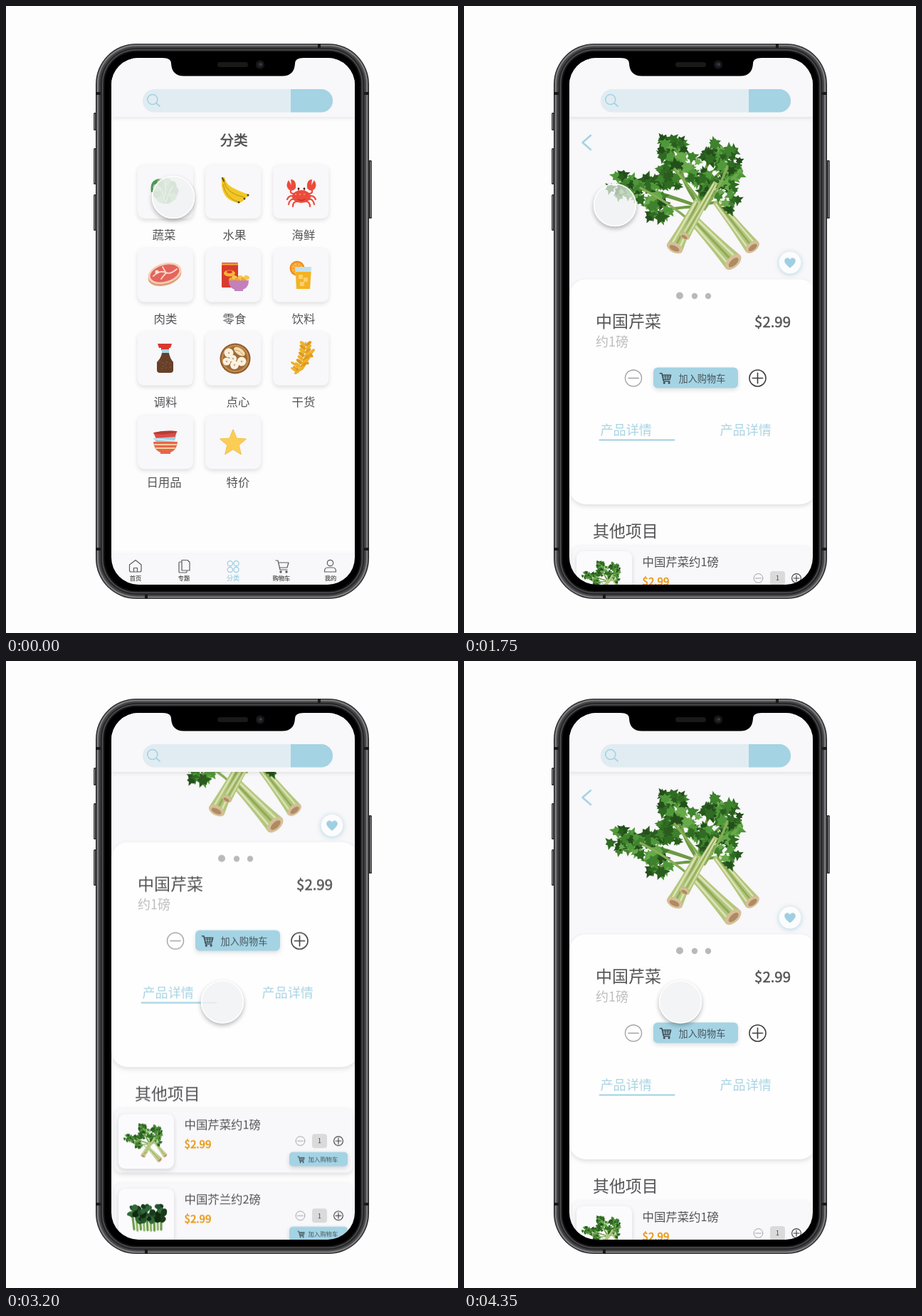
An HTML page with a canvas for the animation above (4400 ms loop, 635 px wide and 882 px high).

```html
<!DOCTYPE html>
<html lang="zh-CN">
<head>
<meta charset="utf-8">
<title>分类</title>
<style>
html, body { margin: 0; width: 100%; height: 100%; overflow: hidden; background: #fefdfe; }
canvas { display: block; width: 635px; height: 882px; }
</style>
</head>
<body>
<canvas id="stage"></canvas>
<script>
const W = 635, H = 882, LOOP = 4400, STEP = 50;
const DPR = window.devicePixelRatio || 1;
const FONT = '"Noto Sans CJK SC", "Noto Sans CJK", "Noto Sans", sans-serif';
const BLUE = '#a4d3e4', PANEL = '#f8f7f9', PAPER = '#fefdfe', INK = '#545456';
let g;

function makeCanvas(cv, h) {
  cv.width = W * DPR;
  cv.height = h * DPR;
  const c = cv.getContext('2d');
  c.scale(DPR, DPR);
  return c;
}

function layer(h, draw) {
  const cv = document.createElement('canvas');
  g = makeCanvas(cv, h);
  draw();
  return cv;
}

// ---- drawing helpers ----
function shade(color, blur, dy) {
  g.shadowColor = color;
  g.shadowBlur = blur * DPR;
  g.shadowOffsetY = dy * DPR;
}

function box(x, y, w, h, r, fill, shadow) {
  g.save();
  if (shadow) shade(shadow, 6, 2.5);
  g.fillStyle = fill;
  g.beginPath();
  g.roundRect(x, y, w, h, r);
  g.fill();
  g.restore();
}

function oval(x, y, rx, ry, fill, turn = 0) {
  g.fillStyle = fill;
  g.beginPath();
  g.ellipse(x, y, rx, ry, turn, 0, 7);
  g.fill();
}

const dot = (x, y, r, fill) => oval(x, y, r, r, fill);
const fillPath = (d, c) => { g.fillStyle = c; g.fill(new Path2D(d)); };

function line(d, color, w) {
  g.strokeStyle = color;
  g.lineWidth = w;
  g.lineCap = g.lineJoin = 'round';
  g.stroke(new Path2D(d));
}

function ring(x, y, r, color, w) {
  g.strokeStyle = color;
  g.lineWidth = w;
  g.beginPath();
  g.arc(x, y, r, 0, 7);
  g.stroke();
}

// y is the optical middle of the line; heavy thickens the strokes
function text(s, x, y, size, color, align = 'left', heavy = 0) {
  g.font = `${size}px ${FONT}`;
  g.textAlign = align;
  g.fillStyle = g.strokeStyle = color;
  g.fillText(s, x, y + size * .38);
  if (heavy) {
    g.lineWidth = heavy;
    g.strokeText(s, x, y + size * .38);
  }
}

function at(x, y, s, draw) {
  g.save();
  g.translate(x, y);
  g.scale(s, s);
  draw();
  g.restore();
}

function seeded(n) {
  return () => (n = (n * 16807) % 2147483647) / 2147483647;
}

// ---- vegetables ----
const GREENS = ['#234f1b', '#2f6b22', '#3f822d', '#4f983a', '#2a5c1f', '#68a94a'];

function frond(x, y, r, turn, color) {
  g.fillStyle = color;
  g.beginPath();
  for (let i = 0; i < 12; i++) {
    const a = turn + i * Math.PI / 6, k = i % 2 ? r * .55 : r * (i % 4 ? .8 : 1.15);
    g.lineTo(x + Math.cos(a) * k, y + Math.sin(a) * k);
  }
  g.fill();
}

function stalk(x1, y1, x2, y2, w) {
  const a = Math.atan2(y2 - y1, x2 - x1);
  at(x1, y1, 1, () => {
    g.rotate(a);
    const n = Math.hypot(x2 - x1, y2 - y1);
    fillPath(`M0 ${-w * .3} Q${n * .6} ${-w * .4} ${n} ${-w * .6} V${w * .6} Q${n * .6} ${w * .4} 0 ${w * .3}Z`, '#b3c67c');
    for (const k of [-.3, 0, .3])
      line(`M4 ${w * k * .5} L${n - 6} ${w * k}`, k ? '#dbe3b4' : '#8faa58', w * .13);
    oval(n, 0, w * .35, w * .6, '#d5bf98');
    oval(n + 1, 0, w * .18, w * .38, '#b08a62');
  });
}

function celery() {
  const rnd = seeded(77);
  const clumps = [[-82, -22, 23, 16, 32], [-48, -15, 24, 24, 36], [-16, -72, 17, 21, 26],
    [-2, -42, 32, 24, 44], [44, -66, 17, 15, 20], [66, -50, 16, 22, 32],
    [46, -20, 30, 22, 32], [-34, 16, 18, 15, 16], [66, 2, 11, 12, 8]];
  for (const [x, y] of clumps) line(`M${x} ${y} Q${x * .5} ${y * .6} 22 8`, '#6d9a43', 4);
  stalk(46, 0, 97, 65, 19);
  for (const [cx, cy, rx, ry, n] of clumps)
    for (let i = 0; i < n; i++) {
      const a = rnd() * 6.283, k = Math.sqrt(rnd());
      frond(cx + Math.cos(a) * k * rx, cy + Math.sin(a) * k * ry, 5 + rnd() * 6, rnd() * 6, GREENS[i % 6]);
    }
  line('M-60 -18 Q-20 2 14 32 M-12 -45 Q8 -20 28 6 M62 -48 Q52 -20 30 12', '#86ad56', 3.5);
  stalk(8, 20, 70, 86, 23);
  stalk(22, 0, -12, 66, 20);
  stalk(46, -26, 2, 50, 12);
}

function leaf(x1, y1, x2, y2, w, color, rib) {
  const dx = x2 - x1, dy = y2 - y1, n = Math.hypot(dx, dy);
  const nx = -dy / n * w, ny = dx / n * w, mx = x1 + dx * .65, my = y1 + dy * .65;
  fillPath(`M${x1} ${y1} Q${mx + nx} ${my + ny} ${x2} ${y2} Q${mx - nx} ${my - ny} ${x1} ${y1}`, color);
  line(`M${x1} ${y1} L${x1 + dx * .8} ${y1 + dy * .8}`, rib, .7);
}

function gaiLan() {
  const rnd = seeded(12);
  for (let i = 0; i < 9; i++) {
    const x = -20 + i * 5;
    line(`M${x} 0 L${x * .95 + 1} ${17 + rnd() * 3}`, i % 2 ? '#8fb86a' : '#6f9c4c', 3.2);
  }
  for (let i = 0; i < 55; i++)
    oval(-24 + rnd() * 48, -15 + rnd() * 20, 3 + rnd() * 3, 3 + rnd() * 2,
      ['#183a1b', '#24512a', '#31693a', '#10290f'][i % 4], rnd() * 3);
}

function spinach() {
  for (let i = 0; i < 18; i++) {
    const a = -1.75 + i * .12, r = 38 + (i * 7 % 5) * 4;
    leaf(-17, 16, -15 + Math.cos(a) * r * 1.05, 15 + Math.sin(a) * r, 8,
      ['#22491f', '#356a2d', '#2a5725', '#477f38'][i % 4], '#6f9b55');
  }
  for (let i = 0; i < 6; i++) line(`M${-28 + i * 2} ${16 + i} L${-10 + i * 2} ${3 + i * 2}`, '#84ac5d', 1.7);
}

function lettuce() {
  for (let i = 0; i < 15; i++) {
    const k = i / 14, y = Math.sin(i * 2.4) * 10;
    leaf(24 - k * 6, 18 + y * .3, -25 + k * 30, -14 + y - k * 5, 9,
      ['#588b2a', '#76aa38', '#93bd4d', '#467722'][i % 4], '#bed681');
  }
  for (let i = 0; i < 5; i++) line(`M${17 + i * 2} ${21 - i * 2} L${-5 + i * 4} ${4 - i}`, '#b6d17c', 1.4);
}

function bokChoy() {
  leaf(4, 13, -30, 16, 12, '#6d9e3b', '#bfd98e');
  leaf(8, 8, -26, -2, 12, '#83b04b', '#cfe3a2');
  leaf(8, 8, -14, -12, 11, '#5e9136', '#bfd98e');
  leaf(8, 4, 0, -18, 10, '#75a844', '#cfe3a2');
  leaf(10, 8, 17, -5, 9, '#679a3c', '#cfe3a2');
  for (let i = 0; i < 5; i++)
    line(`M${-9 + i * 5} ${8 - Math.abs(i - 2) * 2} Q6 11 ${23 + i} ${9 + i * 2}`, i % 2 ? '#c5d998' : '#e0e9c2', 4);
  oval(27, 15, 3, 5, '#eef1dc');
}

// ---- category icons ----
function cabbage() {
  fillPath('M204 262 Q201 245 215 243 Q221 250 212 263Z', '#4f9a58');
  dot(224, 261, 17, '#a9cfa5');
  for (let i = 0; i < 9; i++) dot(224 + Math.cos(i * .7) * 13, 260 + Math.sin(i * .7) * 13, 5.5, i % 2 ? '#bcdcb5' : '#a2c99d');
  line('M224 276 Q221 260 213 252 M225 276 Q229 261 234 254 M224 267 L224 249', '#dcebd6', 1.3);
}

function bananas() {
  fillPath('M303 242 L307 241 Q309 251 319 256 Q331 262 341 265 Q340 269 336 270 Q333 277 326 277 Q305 273 303 252Z', '#f1c727');
  line('M306 247 Q310 264 334 269 M305 251 Q308 270 327 276', '#b88f16', 1);
  line('M304 242 L306 246', '#6f5a18', 2.5);
  for (const [x, y] of [[340, 266], [335, 271], [327, 276]]) dot(x, y, 1.5, '#55401a');
}

function crab() {
  const red = '#ec4b3b';
  for (const s of [-1, 1]) {
    at(415, 262, 1, () => {
      g.scale(s, 1);
      line('M8 2 Q18 3 14 -5 M10 6 Q17 3 20 10 M9 10 Q16 8 18 17 M6 13 Q12 13 12 20', red, 2.2);
      fillPath('M8 -6 Q7 -18 15 -18 L14 -10 L18 -17 Q23 -10 18 -4 Q12 0 8 -6Z', red);
      line('M4 -1 L4 -5', red, 1.5);
      dot(4, -5, 1.4, '#40201c');
    });
  }
  oval(415, 268, 13, 9, red);
  line('M410 272 Q415 275 420 272', '#a9271e', 1);
  for (const x of [407, 413, 419]) dot(x, 265, 1, '#ff9a7d');
}

function meat() {
  oval(223, 379, 24, 14, '#dca07c', -.28);
  oval(223, 376, 24, 14, '#f7cfb2', -.28);
  oval(223, 376, 21, 11.5, '#e4645f', -.28);
  line('M207 380 Q216 371 224 375 Q231 378 240 370 M218 384 Q223 377 226 375 M220 367 L224 374', '#fbd9c3', 1.8);
  dot(212, 374, 2.6, '#fbe7d8');
}

function snack() {
  box(303, 361, 23, 35, 1, '#d93a2f');
  g.fillStyle = '#f3a12e';
  g.fillRect(303, 362, 23, 2.5);
  oval(314, 376, 8, 4.5, '#f2b632');
  oval(314, 374, 4, 2, '#d93a2f');
  for (let i = 0; i < 6; i++) oval(317 + i * 4.2, 385 - i % 2 * 3, 4, 3, i % 2 ? '#f6c64c' : '#e9a92e', .4);
  fillPath('M313 386 H341 Q341 396 333 399 V401 H321 V399 Q313 396 313 386Z', '#c47fbd');
}

function drink() {
  dot(409, 369, 10.5, '#f08d1f');
  dot(409, 369, 8, '#fbb545');
  line('M409 361 V377 M401 369 H417 M403.5 363.5 L414.5 374.5 M403.5 374.5 L414.5 363.5', '#f08d1f', 1);
  fillPath('M406 367 H429 L427 398 H408Z', '#bfe0ee');
  fillPath('M407 374 H428.5 L427 398 H408Z', '#f5b321');
  for (const [x, y] of [[411, 378], [418, 382], [413, 388]]) box(x, y, 6, 6, 1, '#fad06e');
}

function sauce() {
  fillPath('M213 475 H233 L231 481 H229 V484 H218 V481 H215Z', '#d8382f');
  box(219, 483, 10, 6, 0, '#a9d6e6');
  fillPath('M219 488 H229 Q230 495 235 501 V512 Q235 516 231 516 H216 Q212 516 212 512 V501 Q218 495 219 488Z', '#68402a');
  for (let i = 0; i < 9; i++) dot(216 + i * 5 % 16, 500 + i * 7 % 13, .8, '#8d6145');
}

function dimSum() {
  dot(322, 496, 21.5, '#8f5a2c');
  dot(322, 496, 19.5, '#c18a4b');
  dot(322, 496, 17, '#9c6a38');
  for (const [x, y, r] of [[313, 488, 6.5], [310, 500, 5.5], [321, 505, 6], [331, 500, 6.5], [319, 496, 5]]) {
    dot(x, y, r, '#fbf1e0');
    dot(x, y, 1.3, '#c9ad86');
  }
  oval(328, 486, 9, 4.5, '#f5dfb4', .6);
  line('M322 484 Q329 484 333 491', '#d0a367', 1);
}

function wheat() {
  const gold = ['#eeb12b', '#e09a1c'];
  line('M406 516 Q418 500 421 473 M410 512 Q424 504 432 484', '#d89a23', 1.3);
  for (let i = 0; i < 8; i++) {
    const y = 473 + i * 5, x = 421 - i * i * .2;
    oval(x - 4, y + 2, 5, 2.3, gold[i % 2], .7);
    oval(x + 4, y + 2, 5, 2.3, gold[1 - i % 2], -.7);
    if (i < 5) oval(430 - i * 3, 486 + i * 5, 5, 2.2, gold[i % 2], i % 2 ? .5 : -.8);
  }
  for (let i = 0; i < 4; i++) oval(404 + i % 2 * 5, 503 + i * 4, 4.5, 1.8, gold[0], i % 2 ? -.6 : .6);
}

function bowls() {
  fillPath('M207 600 Q224 597 240 598 L237 609 H211Z', '#d94f45');
  oval(224, 600, 16.5, 2.2, '#b73c35', -.06);
  fillPath('M207 608 L239 606 L235 616 H213Z', '#a5cfe2');
  line('M210 609 L238 612', '#e2eff5', 1.5);
  fillPath('M207 613 H241 Q240 625 231 628 V630 H217 V628 Q208 625 207 613Z', '#e5674c');
  line('M209 617 H239 M211 622 H237', '#f7cf9b', 2);
}

function star() {
  let d = '';
  for (let i = 0; i < 10; i++) {
    const a = i * Math.PI / 5 - Math.PI / 2, r = i % 2 ? 8.5 : 19;
    d += `${i ? 'L' : 'M'}${319 + Math.cos(a) * r} ${615 + Math.sin(a) * r}`;
  }
  line(d + 'Z', '#e9b83f', 1.2);
  fillPath(d + 'Z', '#fbcd55');
}

// ---- shared interface parts ----
function cart(x, y, s, color, lw = 1.3) {
  at(x, y, s, () => {
    line('M-9 -8 H-6 L-3 5 H7 M-5 -5 H9 L7 2 H-4', color, lw);
    dot(-2, 8, 1.7, color);
    dot(6, 8, 1.7, color);
  });
}

function darkCart(x, y, s) {
  cart(x, y, s, '#3c4a50', 1.8);
  at(x, y, s, () => line('M-4 -2 H8 M0 -5 V2 M4 -5 V2', '#3c4a50', 1.2));
}

function stepper(x, y, r, plus, w) {
  const color = plus ? '#3d3d3f' : '#a3a3a6', k = r * .62;
  ring(x, y, r, color, w);
  line(`M${x - k} ${y} H${x + k}` + (plus ? `M${x} ${y - k} V${y + k}` : ''), color, w);
}

const chevron = () => line('M178 182 L166.5 192 L178 202', BLUE, 2.5);

function nav() {
  g.save();
  shade('rgba(0,0,0,.05)', 5, -1);
  g.fillStyle = PANEL;
  g.fillRect(148, 771, 342, 44);
  g.restore();
  const c = '#5c5c5e', on = '#94cfe2';
  line('M173.5 786 L182 779.5 L190 786 V794 Q190 796 188 796 H175.5 Q173.5 796 173.5 794Z M179.5 796 V790.5 H184.5 V796', c, 1.2);
  line('M246 782 H244 Q243 782 243 783 V796 Q243 797 244 797 H253 Q254 797 254 796 V795 M247 779.5 H255 L258 782.5 V794 H247Z', c, 1.2);
  for (const x of [314.8, 323.5]) for (const y of [784.2, 793]) ring(x, y, 3.6, on, 1.2);
  cart(388, 788, 1, c, 1.2);
  ring(455.5, 783.5, 4.2, c, 1.2);
  line('M447.5 796 Q447 790 452 790 H459 Q464 790 463.5 796Z', c, 1.2);
  [['首页', 182], ['专题', 250], ['分类', 319], ['购物车', 387], ['我的', 456]].forEach(([s, x], i) =>
    text(s, x, 805, i === 2 ? 9 : 8.2, i === 2 ? on : '#444', 'center', .15));
}

const PRODUCTS = [['中国芹菜约1磅', '$2.99'], ['中国芥兰约2磅', '$2.99'], ['台湾菠菜约1磅', '$2.91'],
  ['A菜(油麦菜)约1磅', '$1.99'], ['青江菜约2磅', '$2.29']];
const PLANTS = [celery, gaiLan, spinach, lettuce, bokChoy];

function product(i, top) {
  const [name, price] = PRODUCTS[i];
  box(152.5, top, 334.5, 90.5, 9, PANEL, 'rgba(0,0,0,.13)');
  box(158, top + 8, 78, 77, 9, '#fbfafc', 'rgba(0,0,0,.14)');
  at(i ? 198 : 196, top + 48, i ? 1 : .285, PLANTS[i]);
  text(name, 250.5, top + 23, 16.4, INK);
  text(price, 250.5, top + 50, 15.2, '#e8960f', 'left', .5);
  stepper(413.5, top + 46, 6.4, false, 1);
  box(430, top + 36, 21, 20, 4, '#dadadb');
  text('1', 440.5, top + 46, 9, '#444', 'center');
  stepper(467, top + 46, 6.4, true, 1.1);
  box(398, top + 61.5, 82, 20, 5, BLUE, 'rgba(0,0,0,.14)');
  darkCart(414.5, top + 72, .52);
  text('加入购物车', 424.5, top + 72, 8.4, '#47565c');
}

// ---- pages ----
function blank(h) {
  g.fillStyle = PAPER;
  g.fillRect(0, 0, W, h);
}

function categoryPage() {
  blank(H);
  text('分类', 320, 189, 19.6, '#4c4c4e', 'center', .5);
  const cells = [['蔬菜', 222, cabbage], ['水果', 321, bananas], ['海鲜', 418, crab],
    ['肉类', 224, meat], ['零食', 321, snack], ['饮料', 418, drink],
    ['调料', 224, sauce], ['点心', 326, dimSum], ['干货', 418, wheat],
    ['日用品', 222, bowls], ['特价', 326, star]];
  const labelY = [322, 439.5, 556.5, 670];
  cells.forEach(([name, x, icon], i) => {
    const row = Math.floor(i / 3);
    box(185 + i % 3 * 95.2, 223 + row * 117.4, 78, 76, 9, PANEL, 'rgba(0,0,0,.13)');
    icon();
    text(name, x, labelY[row], 16.4, INK, 'center');
  });
  nav();
}

function listPage() {
  blank(H);
  chevron();
  text('蔬菜', 322, 188, 19.6, '#4c4c4e', 'center', .5);
  PRODUCTS.forEach((p, i) => product(i, 235 + i * 105.1));
  nav();
}

function detailPage() {
  blank(1100);
  g.fillStyle = PANEL;
  g.fillRect(148, 100, 342, 330);
  chevron();
  at(308, 274, 1, celery);
  g.save();
  shade('rgba(120,190,215,.6)', 6, 1);
  dot(458, 361, 15.5, '#fcfcfd');
  g.restore();
  fillPath('M458 368.5 Q447 360 451.5 355.5 Q455 352.5 458 356.5 Q461 352.5 464.5 355.5 Q469 360 458 368.5Z', '#9ed0e2');
  box(148, 384.5, 347, 316.5, 23, '#fefefe', 'rgba(0,0,0,.13)');
  dot(303, 407.5, 5, '#b9b9bd');
  dot(324, 408, 4.2, '#b9b9bd');
  dot(343, 408, 4.2, '#b9b9bd');
  text('中国芹菜', 185, 443.5, 23, INK);
  text('$2.99', 459, 444.5, 20.4, INK, 'right', .5);
  text('约1磅', 185, 472, 18, '#bdbdc0');
  stepper(238, 523.5, 11.5, false, 1.4);
  stepper(412.5, 523.5, 11.5, true, 1.6);
  box(266, 508.5, 119, 29, 6, BLUE, 'rgba(0,0,0,.13)');
  darkCart(283, 523.5, .85);
  text('加入购物车', 301.5, 523.5, 13.2, '#47565c');
  text('产品详情', 191.5, 596, 18.1, '#a9d4e3');
  text('产品详情', 359.5, 596, 18.1, '#a9d4e3');
  line('M190.5 610.5 H295.5', '#9fd0e2', 2);
  text('其他项目', 181, 738.5, 22.9, INK);
  product(0, 759);
  product(1, 864.1);
}

// ---- phone ----
function phoneBody() {
  g.fillStyle = PAPER;
  g.fillRect(0, 0, W, H);
  for (const [x, y, h] of [[123, 150, 25], [123, 200, 51], [123, 265, 51], [508, 217, 82]]) {
    box(x, y, 6, h, 1.5, '#39393b');
    box(x + (x < 200 ? 1 : 4), y + 2, 1, h - 4, 0, '#8b8b8e');
  }
  const rings = [[0, '#252527'], [1.5, '#7d7d80'], [4, '#464648'], [6.5, '#29292b'], [9, '#515153'], [10.5, '#161617'], [12.5, '#000']];
  for (const [d, c] of rings) box(126 + d, 53 + d * .9, 384 - 2 * d, 781 - d * 1.8, 57 - d, c);
  for (const [x, y, w, h] of [[438, 53, 4, 6], [195, 828, 4, 6], [126, 121, 7, 4], [126, 762, 7, 4], [503, 121, 7, 4], [503, 762, 7, 4]])
    box(x, y, w, h, 0, '#19191a');
}

function topBar() {
  g.save();
  g.beginPath();
  g.roundRect(148, 73, 342, 741, 38);
  g.clip();
  g.save();
  shade('rgba(0,0,0,.09)', 6, 2);
  g.fillStyle = PANEL;
  g.fillRect(140, 60, 358, 96);
  g.restore();
  box(192, 117, 267, 32.5, 16, '#e0ecf2');
  box(400, 117, 59, 32.5, [0, 16, 16, 0], BLUE);
  ring(205.8, 131.5, 7, BLUE, 1.6);
  line('M211 136.5 L216 141', BLUE, 1.8);
  g.restore();
  fillPath('M220 70 V73 Q232 73 232 81 Q233 98.5 250 98.5 H388 Q405 98.5 406 81 Q406 73 418 73 V70Z', '#000');
  box(297, 79, 43, 7, 3.5, '#19191a');
  dot(357, 82.5, 6.2, '#141416');
  dot(357, 82.5, 3.5, '#24242b');
  dot(358, 82, 1.3, '#45454f');
}

const body = layer(H, phoneBody);
const bar = layer(H, topBar);
const category = layer(H, categoryPage);
const list = layer(H, listPage);
const detail = layer(1100, detailPage);

// ---- motion ----
const ctx = makeCanvas(document.getElementById('stage'), H);
const span = (t, a, b) => Math.min(1, Math.max(0, (t - a) / (b - a)));
const ease = (t, a, b) => { const p = span(t, a, b); return p * p * (3 - 2 * p); };
const mix = (a, b, p) => a + (b - a) * p;

function pointer(t) {
  if (t < 1700) {
    const p = ease(t, 620, 1250);
    return [mix(235, 212, p), mix(269, 280, p)];
  }
  const p = ease(t, 1750, 2480);
  return [mix(212, 304, 1 - (1 - p) ** 2), mix(280, 479.5, p)];
}

function drawPointer(t) {
  const [x, y] = pointer(t), r = 30;
  g.save();
  g.beginPath();
  g.rect(0, 0, W, H);
  g.arc(x, y, r, 0, 7);
  g.clip('evenodd');
  shade('rgba(0,0,0,.3)', 6, 3);
  dot(x, y, r, '#fff');
  g.restore();
  dot(x, y, r, `rgba(241,242,244,${mix(.68, .82, ease(t, 1750, 2200))})`);
  ring(x, y, r - .5, 'rgba(255,255,255,.95)', 1.6);
}

function put(cv, y, alpha) {
  if (alpha <= 0) return;
  g.globalAlpha = alpha;
  g.drawImage(cv, 0, y, W, cv.height / DPR);
  g.globalAlpha = 1;
}

function render(t) {
  g = ctx;
  put(body, 0, 1);
  g.save();
  g.beginPath();
  g.roundRect(148, 73, 342, 741, 38);
  g.clip();
  const toList = ease(t, 0, 350), toDetail = ease(t, 1320, 1680);
  const scroll = 142 * (ease(t, 2610, 3330) - ease(t, 3325, 3905));
  if (toList < 1) put(category, 0, 1);
  if (toDetail < 1) put(list, 0, toList);
  put(detail, -scroll, toDetail);
  g.restore();
  put(bar, 0, 1);
  drawPointer(t);
}

const start = performance.now();
function tick() {
  const t = (performance.now() - start) % LOOP;
  render(Math.floor(t / STEP) * STEP);
  requestAnimationFrame(tick);
}
tick();
</script>
</body>
</html>
```
